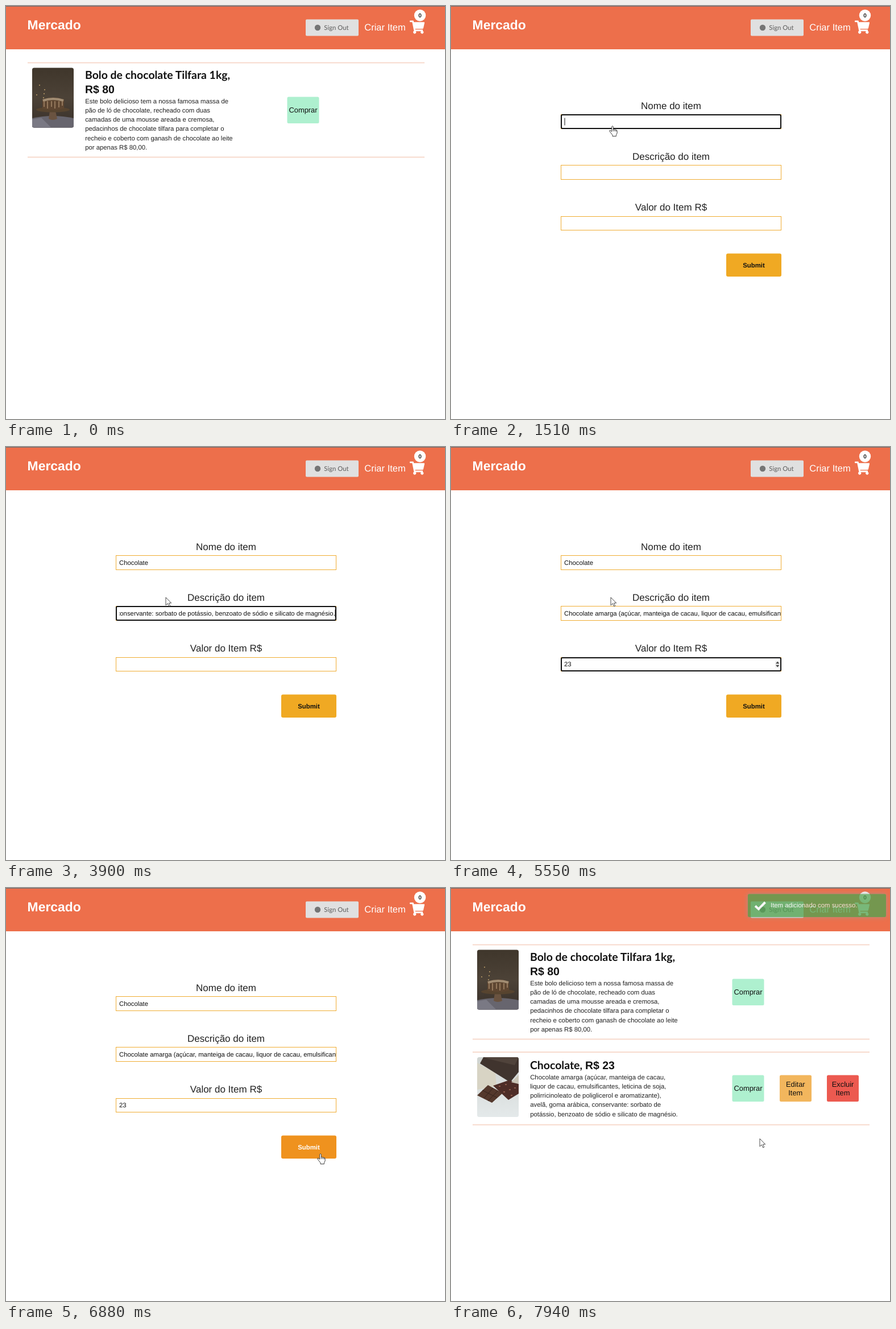
An HTML page for the animation above (8 s loop, 772 px wide and 725 px high).

```html
<!DOCTYPE html>
<html lang="pt-BR">
<head>
<meta charset="utf-8">
<title>Mercado</title>
<style>
  html, body { margin: 0; width: 100%; height: 100%; overflow: hidden; background: #fff; }
  svg { display: block; width: 100%; height: 100%; }
  text { font: 11.34px "Liberation Sans", Arial, sans-serif; fill: #222; text-rendering: geometricPrecision; white-space: pre; }
  .title { font-size: 19.44px; font-weight: 700; fill: #111; }
  .lato { font-family: Lato, sans-serif; }
  .label { font-size: 17px; text-anchor: middle; }
  .button { font-size: 12.9px; text-anchor: middle; fill: #111; }
  .rule { stroke: #f6d6c7; stroke-width: 1.7; }
  .field { fill: #fff; stroke: #f0ad33; }
  .value { fill: #111; }
</style>
</head>
<body>
<svg viewBox="0 0 772 725">
  <defs>
    <linearGradient id="wall" x2="0" y2="1">
      <stop stop-color="#3f362b"/><stop offset=".5" stop-color="#4c4237"/><stop offset=".8" stop-color="#40372f"/>
    </linearGradient>
    <linearGradient id="plate" x2="0" y2="1">
      <stop stop-color="#cfd3d0"/><stop offset="1" stop-color="#e4e9ea"/>
    </linearGradient>
    <clipPath id="cakeFrame"><rect x="46" y="108.5" width="73" height="105" rx="3.5"/></clipPath>
    <clipPath id="barFrame"><rect x="46" y="297" width="73" height="105" rx="3.5"/></clipPath>
    <clipPath id="fieldClip"><rect x="199" y="280" width="381.5" height="24"/></clipPath>
    <filter id="glow" x="-10%" y="-40%" width="120%" height="180%">
      <feDropShadow dx="0" dy="0" stdDeviation="4" flood-color="#999"/>
    </filter>
  </defs>

  <rect width="772" height="725" fill="#fff"/>
  <rect width="772" height="76" fill="#ed6f4b"/>
  <rect width="772" height="1" fill="#6b6b6d"/>
  <text x="37.6" y="40.8" style="font-size:22.9px;font-weight:700;fill:#fff">Mercado</text>
  <rect x="527" y="23.5" width="93" height="29" rx="2" fill="#e0e0e0"/>
  <circle cx="548" cy="38" r="5.2" fill="#757575"/>
  <text class="lato" x="559.3" y="42" style="fill:#666;font-weight:500">Sign Out</text>
  <rect id="linkBack" x="623" y="20" width="87" height="34" fill="#ee5f40"/>
  <text id="link" x="630.3" y="43" style="font-size:16.5px">Criar Item</text>
  <path fill="#fff" transform="translate(710 25.4) scale(.0453)" d="M528 301l47-208C579 78 567 64 552 64H159l-9-45C148 8 138 0 127 0H24C11 0 0 11 0 24v16c0 13 11 24 24 24h70l70 343a56 56 0 1 0 67 9h210a56 56 0 1 0 63-10l6-25c3-15-8-29-24-29H218l-7-32h294c11 0 21-8 23-19z"/>
  <circle cx="728" cy="16.5" r="10.2" fill="#fff"/>
  <text x="728" y="20" text-anchor="middle" style="font-size:10px;font-weight:700">0</text>

  <g id="list">
    <path class="rule" d="M38 99.6H736M38 265.4H736"/>
    <g clip-path="url(#cakeFrame)">
      <rect x="46" y="108" width="73" height="106" fill="url(#wall)"/>
      <path d="M46 197Q82 189 119 197V214H46Z" fill="#67656e"/>
      <path d="M46 199L62 196L80 214H46Z" fill="#7a7984"/>
      <path d="M77 184H87L90 198Q82 202 75 198Z" fill="#6a5340"/>
      <ellipse cx="82.5" cy="182" rx="29.5" ry="4.5" fill="#57442f"/>
      <path d="M64 164Q83 157 102 164V180Q83 185 64 180Z" fill="#5e4631"/>
      <path d="M65 166Q83 160 101 166" fill="none" stroke="#a28d73" stroke-width="4"/>
      <path d="M67 167v10m6-10v13m7-13v10m6-10v13m7-13v11m6-11v8" stroke="#94785c" stroke-width="2"/>
      <path d="M58 139h2m7 8h2m-16 9h2m11-2h2m-3 7h2" stroke="#bfa06a" stroke-width="1.6"/>
    </g>
    <text class="title lato" x="139" y="128">Bolo de chocolate Tilfara 1kg,</text>
    <text class="title" x="139" y="152.6">R$ 80</text>
    <g id="cakeText"></g>
    <rect x="494.5" y="159.5" width="56" height="46.5" rx="2.5" fill="#aef0cf"/>
    <text class="button" x="522.5" y="187">Comprar</text>
  </g>

  <g id="newItem">
    <path class="rule" d="M38 288.2H736M38 415.7H736"/>
    <g clip-path="url(#barFrame)">
      <rect x="46" y="297" width="73" height="105" fill="url(#plate)"/>
      <path d="M46 307L78 325L80 348L46 354Z" fill="#d8d4c4"/>
      <path d="M57 297H119V323L104 341L51 308Z" fill="#40342e"/>
      <path d="M57 297H119L112 311L66 300Z" fill="#50433b"/>
      <path d="M46 364L65 346L91 360L72 377Z" fill="#54382c"/>
      <path d="M55 355L81 368M74 351L58 369M82 356L65 374" stroke="#36231c"/>
      <path d="M74 347L103 337L119 344V361L101 372Z" fill="#4e2d27"/>
      <path d="M84 348h3m8-3h3m4 9h3m-13 4h3m10 6h3m3-13h3" stroke="#8c5a4a" stroke-width="2"/>
      <path d="M106 341L119 328V344Z" fill="#c9c4b5"/>
    </g>
    <text class="title lato" x="139" y="318">Chocolate,</text>
    <text class="title" x="236" y="318">R$ 23</text>
    <g id="barText"></g>
    <rect x="494.5" y="328.5" width="56" height="46.5" rx="2.5" fill="#aef0cf"/>
    <text class="button" x="522.5" y="356">Comprar</text>
    <rect x="578" y="328.5" width="56" height="46.5" rx="2.5" fill="#f2b65d"/>
    <text class="button" x="605.8" y="349">Editar</text>
    <text class="button" x="605.8" y="363.7">Item</text>
    <rect x="661" y="328.5" width="56" height="46.5" rx="2.5" fill="#ec5a50"/>
    <text class="button" x="689" y="349">Excluir</text>
    <text class="button" x="689" y="363.7">Item</text>
  </g>

  <g id="form">
    <text class="label" x="387" y="180.6">Nome do item</text>
    <text class="label" x="387" y="269.8">Descrição do item</text>
    <text class="label" x="387" y="359.4">Valor do Item R$</text>
    <rect class="field" x="193.5" y="190.5" width="387" height="25"/>
    <rect class="field" x="193.5" y="279.5" width="387" height="25"/>
    <rect class="field" x="193.5" y="369.5" width="387" height="24"/>
    <rect id="ring" x="194" width="386" rx="2" fill="#fff" stroke="#101010" stroke-width="2"/>
    <text class="value" id="name" x="199" y="207"></text>
    <g clip-path="url(#fieldClip)"><text class="value" id="description" y="296"></text></g>
    <text class="value" id="price" x="199" y="385"></text>
    <g id="spinner">
      <rect x="570" y="375.5" width="8.5" height="12" fill="#efefef"/>
      <path d="M571 380.3L574.2 376.5L577.4 380.3ZM571 382.7L574.2 386.5L577.4 382.7Z" fill="#444"/>
    </g>
    <rect id="caret" width="1" height="13" fill="#111"/>
    <rect id="submit" x="484" y="434.5" width="97" height="40.5" rx="3"/>
    <text id="submitText" x="532.5" y="459" text-anchor="middle" font-weight="700" style="font-weight:700">Submit</text>
  </g>

  <g id="toast">
    <rect x="522" y="10.5" width="243" height="40.5" rx="2.5" fill="#51a351" filter="url(#glow)"/>
    <path d="M535 31.5L541 37L552.5 25" fill="none" stroke="#fff" stroke-width="4"/>
    <text x="562" y="34" style="fill:#fff">Item adicionado com sucesso.</text>
  </g>

  <g id="pointer" fill="#fff" stroke="#222" stroke-linejoin="round">
    <path id="arrow" transform="scale(.81)" d="M0 0V17L4 13.2L7 19.5L9.6 18.4L6.8 12.3H12Z"/>
    <g id="hand" transform="scale(.86) translate(-6.5 0)">
      <path d="M5 1.7Q6.5-.6 8 1.7V8q1.5-1.5 3 .3q1.5-1 2.8.6q2-.5 2.2 1.6V15L14 19v2.5H6.5V19L.8 11.7Q-.3 9.3 2 9.5L5 12Z"/>
      <path d="M8 8v3.5M11 8.5v3M13.8 9v3" fill="none"/>
    </g>
  </g>
</svg>
<script>
const LOOP = 8000;
const FORM_OPEN = 1050, SUBMITTED = 7540;
const PASTE = 3900, BLUR = 6740;
const nameKeys = [2040, 2230, 2370, 2470, 2560, 2660, 2760, 2900, 2960];
const priceKeys = [4890, 5030];
// Each focused field: start time, top, ring height
const focuses = [[1500, 190, 24], [3230, 279, 24], [4370, 369, 23]];
const caretResets = [...focuses.map(f => f[0]), ...nameKeys, PASTE, ...priceKeys];
const pointerPath = [
  [260, 755, 694], [920, 682, 28], [1080, 682, 28], [1500, 284, 210],
  [1840, 281, 264], [6020, 281, 264], [6800, 553, 466], [7540, 553, 466], [7760, 543, 440]
];
const formZones = [[193, 190, 581, 216], [193, 279, 581, 305], [193, 369, 581, 394], [484, 434, 581, 475]];
const linkZone = [623, 20, 710, 54];

const cakeLines = [
  'Este bolo delicioso tem a nossa famosa massa de',
  'pão de ló de chocolate, recheado com duas',
  'camadas de uma mousse areada e cremosa,',
  'pedacinhos de chocolate tilfara para completar o',
  'recheio e coberto com ganash de chocolate ao leite',
  'por apenas R$ 80,00.'
];
const barLines = [
  'Chocolate amarga (açúcar, manteiga de cacau,',
  'liquor de cacau, emulsificantes, leticina de soja,',
  'polirricinoleato de poliglicerol e aromatizante),',
  'avelã, goma arábica, conservante: sorbato de',
  'potássio, benzoato de sódio e silicato de magnésio.'
];

const el = id => document.getElementById(id);
const show = (id, on) => el(id).style.display = on ? '' : 'none';
const set = (id, attrs) => { for (const k in attrs) el(id).setAttribute(k, attrs[k]); };
const ramp = (t, a, b) => Math.min(1, Math.max(0, (t - a) / (b - a)));
const swing = p => .5 - Math.cos(Math.PI * p) / 2;
const mix = (a, b, p) => `rgb(${a.map((v, i) => Math.round(v + (b[i] - v) * p))})`;
const typed = (word, keys, t) => word.slice(0, keys.filter(k => k <= t).length);
const inside = ([l, t, r, b], x, y) => x >= l && x < r && y >= t && y < b;
const paragraph = (id, lines, y) => el(id).innerHTML =
  lines.map((s, i) => `<text x="139.2" y="${y + i * 16.13}">${s}</text>`).join('');

function pointerAt(t) {
  const next = pointerPath.findIndex(p => p[0] > t);
  if (next < 0) return pointerPath.at(-1).slice(1);
  const [t0, x0, y0] = pointerPath[Math.max(0, next - 1)], [t1, x1, y1] = pointerPath[next];
  const p = swing(ramp(t, t0, t1));
  return [x0 + (x1 - x0) * p, y0 + (y1 - y0) * p];
}

function drawForm(t) {
  el('name').textContent = typed('Chocolate', nameKeys, t);
  el('price').textContent = typed('23', priceKeys, t);

  const atEnd = t < focuses[2][0];
  el('description').textContent = t >= PASTE ? barLines.join(' ') : '';
  set('description', { x: atEnd ? 578.8 : 199, 'text-anchor': atEnd ? 'end' : 'start' });

  const index = t < BLUR ? focuses.filter(f => f[0] <= t).length - 1 : -1;
  const focused = index >= 0;
  const sinceReset = t - Math.max(...caretResets.filter(k => k <= t));
  show('ring', focused);
  show('spinner', index === 2);
  show('caret', focused && sinceReset % 1040 < 520);
  if (focused) {
    const [, top, height] = focuses[index];
    const text = el(['name', 'description', 'price'][index]);
    const x = index === 1 && t >= PASTE ? 578.5 : 199.5 + text.getComputedTextLength();
    set('ring', { y: top + 1, height });
    set('caret', { x, y: top + 6.5 });
  }

  const hover = ramp(t, 6640, 6870);
  set('submit', { fill: mix([240, 169, 35], [239, 146, 30], hover) });
  el('submitText').style.fill = mix([17, 17, 17], [255, 255, 255], hover);
}

function drawPointer(t, onForm) {
  const [x, y] = pointerAt(t);
  const hand = inside(linkZone, x, y) || onForm && formZones.some(z => inside(z, x, y));
  show('pointer', t >= pointerPath[0][0]);
  show('hand', hand);
  show('arrow', !hand);
  set('pointer', { transform: `translate(${x} ${y})` });
}

function draw() {
  const t = performance.now() % LOOP;
  const onForm = t >= FORM_OPEN && t < SUBMITTED;
  show('list', !onForm);
  show('newItem', t >= SUBMITTED);
  show('form', onForm);
  if (onForm) drawForm(t);

  const linkHover = ramp(t, 800, 950) - ramp(t, 1150, 1270);
  set('linkBack', { opacity: linkHover });
  el('link').style.fill = mix([255, 255, 255], [34, 34, 34], linkHover);

  set('toast', { opacity: .8 * swing(ramp(t, 7670, 7980)) });
  drawPointer(t, onForm);
  requestAnimationFrame(draw);
}

paragraph('cakeText', cakeLines, 171);
paragraph('barText', barLines, 336);
draw();
</script>
</body>
</html>
```
